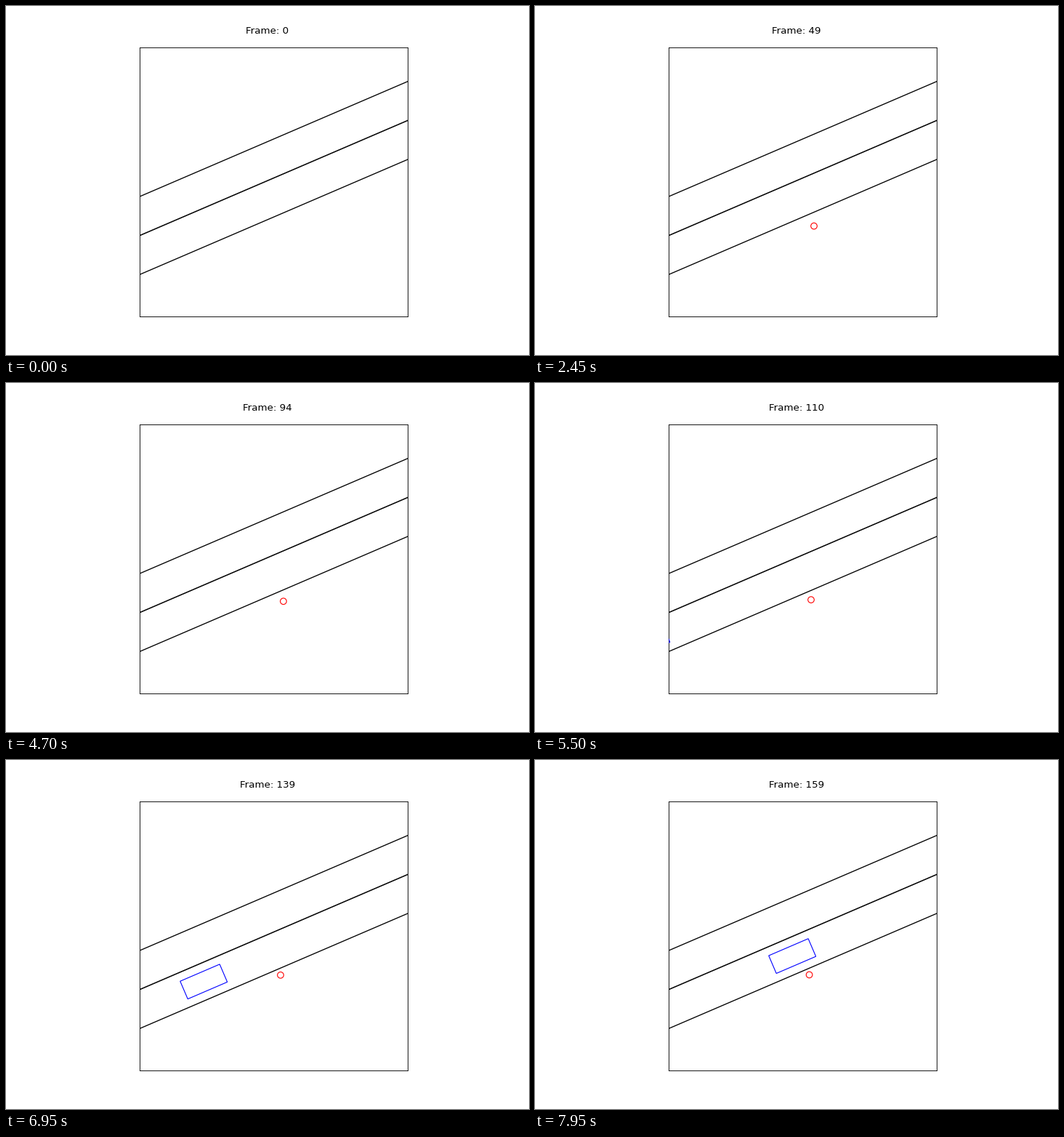
These frames come from a looping animation (720 by 480 pixels, 8 s). A matplotlib script:

```python
import numpy as np
import matplotlib.pyplot as plt
from matplotlib.animation import FuncAnimation
from matplotlib.patches import Circle, Polygon

FRAMES, INTERVAL = 160, 50
WIDTH, HEIGHT, DPI = 720, 480, 80
LEFT, RIGHT, TOP, BOTTOM = 184.2, 553.4, 57.4, 427.2

# Road: parallel lane borders, the middle one shared by both lanes
SLOPE = -0.429
FIRST_BORDER, LANE = 262.0, 53.65

HEADING = np.arctan(SLOPE)
CAR_LENGTH, CAR_WIDTH, CAR_SPEED = 59.2, 26.6, 4.1
CAR_AT_139 = np.array([272.2, 304.8])

WALK_START = np.array([384.2, 302.8])
WALK_SHIFT = np.array([-6.7, -7.5])

plt.rcParams["font.family"] = "DejaVu Sans"
fig = plt.figure(figsize=(WIDTH / DPI, HEIGHT / DPI), dpi=DPI,
                 facecolor="white")
ax = fig.add_axes([LEFT / WIDTH, 1 - BOTTOM / HEIGHT,
                   (RIGHT - LEFT) / WIDTH, (BOTTOM - TOP) / HEIGHT])
ax.set(xlim=(LEFT, RIGHT), ylim=(BOTTOM, TOP), xticks=[], yticks=[])

for i in range(3):
    start = FIRST_BORDER + i * LANE
    ax.plot([LEFT, RIGHT], [start, start + SLOPE * (RIGHT - LEFT)],
            color="black", lw=1.4 if i == 1 else 1.2)

outline = dict(fill=False, lw=1, zorder=3)
car = ax.add_patch(Polygon(np.zeros((4, 2)), ec="blue", **outline))
walker = ax.add_patch(Circle((0, 0), 4.3, ec="red", **outline))
label = fig.text(0.5, 0.92, "", ha="center", fontsize=12, color="black")


def car_corners(frame):
    center = CAR_AT_139 + (frame - 139) * CAR_SPEED * np.array([1, SLOPE])
    along = np.array([np.cos(HEADING), np.sin(HEADING)]) * CAR_LENGTH / 2
    across = np.array([-np.sin(HEADING), np.cos(HEADING)]) * CAR_WIDTH / 2
    return center + np.array([along + across, along - across,
                              -along - across, across - along])


def walker_position(frame):
    ease = 1 / (1 + np.exp((103 - frame) / 14))
    return WALK_START + ease * WALK_SHIFT


def draw(frame):
    label.set_text(f"Frame: {frame}")
    car.set_xy(car_corners(frame))
    walker.center = tuple(walker_position(frame))
    walker.set_visible(frame > 0)
    return car, walker, label


anim = FuncAnimation(fig, draw, frames=FRAMES, interval=INTERVAL,
                     repeat=True, repeat_delay=0, blit=False)
plt.show()
```
